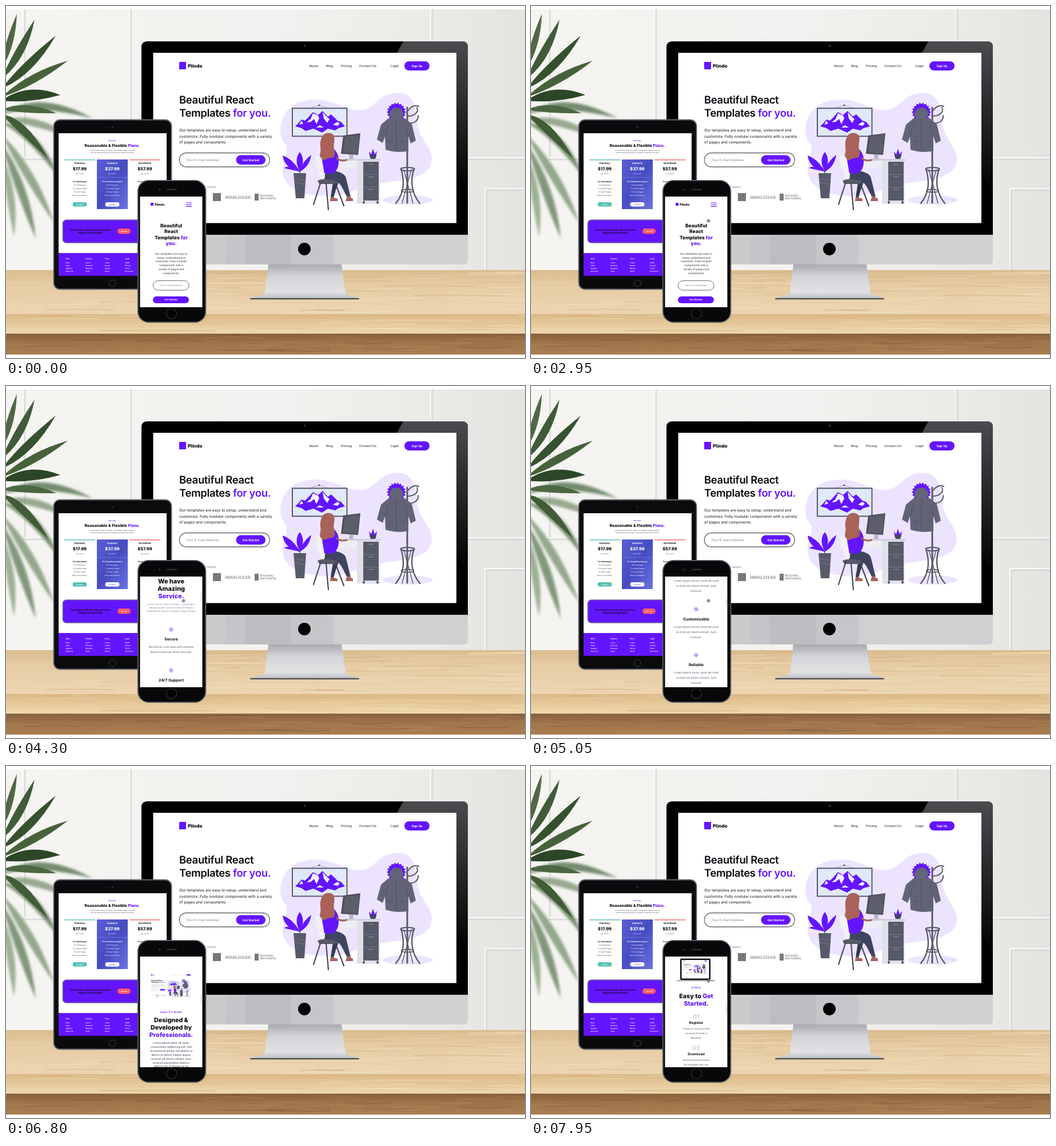
These frames come from a looping animation (908x617 px, 8 s). An HTML page:

```html
<!DOCTYPE html>
<html lang="en">
<head>
<meta charset="utf-8">
<title>Responsive templates</title>
<style>
html, body { margin: 0; width: 100%; height: 100%; overflow: hidden; background: #fff; }
svg { display: block; width: 100vw; height: 100vh; }
text { font-family: Inter, Roboto, sans-serif; text-rendering: geometricPrecision; }
text.serif { font-family: "Liberation Serif", "Noto Serif", serif; }
</style>
</head>
<body>
<svg id="stage" viewBox="0 0 908 617" preserveAspectRatio="none"></svg>
<script>
const PURPLE = '#6415ff', INK = '#0b0b12', SLATE = '#4a5060', MUTED = '#8a96a8';
const BRAND = 'Plindo';

// ---- drawing helpers ----
const attrs = (o) => Object.entries(o).map(([k, v]) => ` ${k}="${v}"`).join('');
const rect = (x, y, w, h, fill, r = 0, more = {}) =>
  `<rect x="${x}" y="${y}" width="${w}" height="${h}" rx="${r}" fill="${fill}"${attrs(more)}/>`;
const path = (d, fill, more = {}) => `<path d="${d}" fill="${fill}"${attrs(more)}/>`;
const line = (d, stroke, w = 1, more = {}) =>
  path(d, 'none', { stroke, 'stroke-width': w, 'stroke-linecap': 'round', 'stroke-linejoin': 'round', ...more });
const oval = (x, y, rx, ry, fill, more = {}) =>
  `<ellipse cx="${x}" cy="${y}" rx="${rx}" ry="${ry}" fill="${fill}"${attrs(more)}/>`;
// y is the optical middle of the line
const text = (x, y, str, size, weight = 500, fill = INK, anchor = 'middle', more = {}) =>
  `<text x="${x}" y="${(y + size * 0.36).toFixed(2)}" font-size="${size}" font-weight="${weight}" fill="${fill}" text-anchor="${anchor}"${attrs(more)}>${str}</text>`;
const left = (x, y, str, size, weight, fill, more) => text(x, y, str, size, weight, fill, 'start', more);
const lines = (x, y, gap, rows, size, weight, fill, anchor) =>
  rows.map((row, i) => text(x, y + i * gap, row, size, weight, fill, anchor)).join('');
const pill = (x, y, w, h, label, size, fill = PURPLE, ink = '#fff') =>
  rect(x, y, w, h, fill, h / 2) + text(x + w / 2, y + h / 2, label, size, 700, ink);
const accent = (str) => `<tspan fill="${PURPLE}">${str}</tspan>`;
const gradient = (id, stops, x2 = 0, y2 = 1) =>
  `<linearGradient id="${id}" x2="${x2}" y2="${y2}">` +
  stops.map(([o, c]) => `<stop offset="${o}" stop-color="${c}"/>`).join('') + '</linearGradient>';

let seed = 7;
const rnd = () => (seed = (seed * 16807) % 2147483647) / 2147483647;

// ---- room ----
function leaf(x0, y0, cx, cy, x1, y1, w, fill, opacity = 1) {
  const dx = x1 - x0, dy = y1 - y0, len = Math.hypot(dx, dy);
  const nx = -dy / len * w, ny = dx / len * w;
  return path(`M${x0} ${y0}Q${cx + nx} ${cy + ny} ${x1} ${y1}Q${cx - nx} ${cy - ny} ${x0} ${y0}`, fill, { opacity });
}

function molding(x, y, w, h) {
  return rect(x, y, w, h, 'none', 0, { stroke: '#d9d8d6', 'stroke-width': 5, opacity: .7 }) +
    rect(x - 2, y - 2, w, h, 'none', 0, { stroke: '#fafafa', 'stroke-width': 2 });
}

function grain(count, y0, h, w, dark, light) {
  let s = '';
  for (let i = 0; i < count; i++) {
    const x = rnd() * 980 - 80, y = y0 + rnd() * h, len = w * (.3 + rnd());
    s += line(`M${x.toFixed()} ${y.toFixed(1)}q${(len / 2).toFixed()} ${(rnd() * 6 - 3).toFixed(1)} ${len.toFixed()} 0`,
      rnd() < .5 ? dark : light, (.8 + rnd() * 2).toFixed(1), { opacity: .28 });
  }
  return s;
}

function room() {
  let s = rect(0, 6, 908, 460, 'url(#wall)');
  s += molding(32, -20, 186, 288) + molding(745, -20, 180, 288) + molding(840, 322, 90, 170);
  s += rect(0, 0, 908, 6, '#fff');

  s += '<g filter="url(#soft)">' +
    leaf(-8, 190, 55, 158, 152, 197, 14, '#5f7a59', .85) + leaf(-8, 200, 50, 195, 118, 232, 13, '#78916f', .75) +
    leaf(-8, 205, 45, 215, 92, 300, 15, '#647f5c', .85) + leaf(-8, 225, 40, 290, 84, 380, 15, '#7c9674', .8) +
    leaf(-8, 240, 30, 320, 52, 408, 15, '#66805f', .8) + leaf(-8, 260, 12, 330, 14, 405, 13, '#87a07e', .8) + '</g>';
  s += '<g filter="url(#haze)">' +
    leaf(-8, 110, 6, 70, 19, 14, 11, '#4f6844') + leaf(-8, 128, 24, 88, 50, 24, 14, '#3f5b38') +
    leaf(-8, 145, 36, 112, 87, 52, 15, '#35512f') + leaf(-8, 160, 45, 128, 108, 96, 14, '#46623a') +
    leaf(-8, 166, 40, 152, 95, 156, 19, '#2c4728') + leaf(-8, 182, 35, 176, 88, 188, 13, '#4c6742') +
    leaf(-8, 190, 26, 205, 74, 268, 14, '#405d38') + '</g>';

  s += rect(0, 463, 908, 77, 'url(#top)') + rect(0, 540, 908, 35, 'url(#edge)') + rect(0, 575, 908, 36, 'url(#under)');
  s += grain(70, 465, 73, 150, '#c79d69', '#f7e8cb') + grain(24, 542, 31, 170, '#cfa672', '#f6e4c0') +
    grain(36, 578, 30, 90, '#6f4c2e', '#bd9064');
  return s + rect(0, 574, 908, 1.5, '#7d5835', 0, { opacity: .6 }) + rect(0, 611, 908, 6, '#fff');
}

// ---- hero artwork ----
function art() {
  const dark = '#575a68', deep = '#45485a', pale = '#d9d9e2';
  let s = path('M480 217C482 185 502 165 540 164C580 163 600 190 632 180C650 172 655 152 687 152C714 153 718 180 720 205C722 232 745 246 745 268C744 300 705 304 668 309C625 314 600 333 560 333C515 333 488 318 484 292C482 270 496 255 489 243C484 236 480 230 480 217Z', '#ece4ff');
  s += oval(703, 340, 44, 8, '#ece4ff');
  // picture
  s += line('M532 179L548 174L564 179', '#8a8a94', .7) + oval(548, 174, 1.6, 1.6, dark);
  s += rect(501, 179.3, 95.5, 49, '#dfe9f8', 0, { stroke: dark, 'stroke-width': 2 });
  s += path('M506 211L512 205L517 199L523 201L530 194L537 186L546 191L554 184L563 194L569 190L580 201L586 203L593 211L582 214L576 218L563 215L553 222L538 215L524 219L517 214Z', PURPLE);
  s += path('M537 188L533 198L526 204L533 203L539 198L543 207L548 197L546 192ZM554 186L556 197L562 205L566 198L562 195ZM517 201L513 208L520 206ZM580 203L572 208L580 210L584 206ZM549 209L543 213L556 213Z', '#f5f8ff');
  // desk, screen and small plant
  s += path('M590 227L620 223L616 261L586 259Z', '#4c4d5a') + path('M593 229L618 225.5L614.5 259L589.5 257Z', '#5d5e6b');
  s += path('M600 260L608 261L607 267L613 269H597L601 266Z', '#b5b5c0');
  s += rect(580, 268, 75, 3.5, '#cfcfd9') + rect(541, 271, 73, 13, '#ededf3') + rect(614, 271.5, 40, 75, '#e1e1e9');
  s += rect(625, 273, 27, 68, dark) + [295, 317].map(y => rect(625, y, 27, .8, '#7d7f8e')).join('') +
    [277, 299, 321].map(y => rect(634, y, 9, .9, '#9698a6')).join('');
  s += oval(626, 344, 1.8, 2.5, deep) + oval(650, 344, 1.8, 2.5, deep);
  s += path('M637 266L635 255L639 260L642 250L645 260L649 254L647 266Z', PURPLE) + path('M636 261H648L646 268H638Z', deep);
  // floor plant
  const frond = (x, y, cx, cy, w) => leaf(514, 290, cx, cy, x, y, w, PURPLE);
  s += line('M514 294V275M514 292L503 280M514 291L524 279', deep, 1);
  s += frond(484, 262, 494, 276, 11) + frond(514, 256, 514, 270, 11) + frond(534, 261, 524, 278, 8) + frond(486, 284, 498, 282, 5);
  s += path('M503 293H525L522 337H507Z', dark) + line('M504 302L524 306M505 309L523 313', '#77798a', 1);
  // seated figure seen from behind
  s += path('M560 288C572 287 589 291 594 299C598 313 600 324 603 334L597 336C591 324 587 314 581 309C572 312 560 309 556 303Z', '#3e4460');
  s += path('M583 306L577 322L573 336L568 335L572 310Z', '#343a54');
  s += path('M597 332L607 338V342H594ZM568 334L580 338V342H567Z', '#a3655b');
  s += path('M558 250C568 244 580 252 582 267C583 281 579 292 569 294L556 293C551 280 551 262 558 250Z', PURPLE);
  s += line('M579 267C584 271 588 272 596 270', '#a3655b', 3);
  s += path('M555 226C560 221 570 221 574 228C576 236 572 243 574 251C577 258 575 266 570 266C560 266 557 273 551 269C546 265 552 256 550 247C549 239 551 231 555 226Z', '#a86259');
  s += path('M541 264C545 260 551 263 553 270L558 300C557 305 552 305 549 300Z', '#f1f1f6');
  s += path('M545 306C554 302 572 303 580 308L578 312L548 312Z', dark);
  s += line('M551 308L538 348M576 310L591 350M560 311L564 357', deep, 2.2);
  // coat rack
  s += line('M702 178V345', dark, 3) + line('M702 193C716 193 722 186 719 178M702 205C712 207 722 202 721 192M704 183C708 176 716 173 722 176', dark, 2);
  s += line('M691 285C697 306 698 326 682 346M714 285C707 306 708 326 724 346', dark, 2.4) + line('M696 287C702 310 707 326 712 346M709 287C703 310 698 326 693 346', dark, 1.4);
  s += oval(702.5, 286, 12, 3, 'none', { stroke: dark, 'stroke-width': 2.2 }) + oval(702.5, 324, 11, 2.5, 'none', { stroke: dark, 'stroke-width': 1.6 });
  const fur = Array.from({ length: 36 }, (_, i) => {
    const a = i * Math.PI / 18, r = i % 2 ? 14 : 17;
    return `${(683 + r * Math.cos(a)).toFixed(1)} ${(186 + r * Math.sin(a)).toFixed(1)}`;
  });
  s += path('M' + fur.join('L') + 'Z', PURPLE) + oval(683, 189, 12, 11, '#62647a');
  s += path('M669 197L698 197L710 207L717 236L708 241L704 228V254C692 257 676 256 664 252L663 229L659 240L649 234L656 208Z', '#626476');
  s += line('M683 199V254M664 228L668 210M704 227L699 210', '#4b4d60', 1) + line('M669 238H676M690 238H698', '#4b4d60', 1);
  return s;
}

function hero() {
  const nav = [[530, 'About'], [560, 'Blog'], [586, 'Pricing'], [618, 'Contact Us'], [672.5, 'Login']];
  const title = { 'letter-spacing': -.35 };
  return rect(303, 98, 12, 13, PURPLE) + left(318, 105, BRAND, 8.2, 800) +
    nav.map(([x, s]) => left(x, 105.3, s, 5.6, 600, SLATE)).join('') + pill(697, 97, 44, 16, 'Sign Up', 5) +
    left(303, 164, 'Beautiful React', 18.5, 600, INK, title) +
    left(303, 187.6, 'Templates ' + accent('for you.'), 18.5, 600, INK, title) +
    lines(303, 217.5, 10.8, ['Our templates are easy to setup, understand and',
      'customize. Fully modular components with a variety', 'of pages and components.'], 6.55, 500, '#30333d', 'start') +
    rect(303.3, 257.5, 158, 24.5, '#fff', 12.2, { stroke: '#666671', 'stroke-width': 1.3 }) +
    left(315, 269.7, 'Your E-mail Address', 6, 400, '#858591') + pill(402.5, 261.5, 51.5, 16.5, 'Get Started', 5.2) +
    text(368, 317.5, 'OUR TRUSTED CUSTOMERS', 4.4, 600, MUTED, 'end', { 'letter-spacing': .4 }) +
    rect(362, 328, 14, 14, '#77777c') +
    left(383, 335.3, 'BRISKLEDGER', 7.8, 400, '#77777c', { class: 'serif', 'letter-spacing': -.8 }) +
    rect(435, 329, 7, 12, '#77777c') + left(444, 332.7, 'REGIONAL', 4.8, 500, '#77777c') + left(444, 337.7, 'WAYFARERS', 4.8, 500, '#77777c') +
    '<use href="#art"/>';
}

// ---- devices ----
function desktop() {
  return path('M459 453H587L594 503C595 508 610 508 618 513H427C436 508 452 508 453 503Z', 'url(#neck)') +
    rect(427, 512, 191, 2.2, '#4b4b55', 1) +
    path('M237 401H808V445Q808 453 800 453H245Q237 453 237 445Z', '#d0d0d3') +
    rect(350, 401, 34, 52, '#cacacc') + rect(384, 401, 34, 52, '#c4c5c8') + rect(418, 401, 81, 52, '#bcbdc1') + rect(499, 401, 74, 52, '#c5c6c9') +
    path('M237 401V72Q237 62 247 62H798Q808 62 808 72V401Z', '#000') +
    path('M695 62H798Q808 62 808 72V330L788 290V82H684Z', 'url(#glare)') +
    oval(522.5, 69.5, 2, 2, '#2d2d33') + rect(257.5, 82, 530.5, 298.5, '#fff') +
    '<use href="#hero"/>' + oval(522, 426, 11, 11, '#000');
}

function tablet() {
  const card = (x, name, price, bar, mid) => {
    const ink = mid ? '#fff' : INK, soft = mid ? '#e8e9ff' : '#5f6572';
    return (mid ? rect(x - 27, 269, 54, 87, 'url(#plan)') : rect(x - 27, 269, 54, 1.4, bar)) +
      text(x, 275.5, name, 3.6, 700, ink) + text(x, 285, price, 7.4, 800, ink) + text(x, 293.5, 'per month', 2.8, 500, soft) +
      (mid ? rect(x - 27, 300, 54, .5, '#8d92f2') : '') + text(x, 308, mid ? 'For Small Businesses' : 'For Individuals', 3.4, 700, ink) +
      lines(x, 314.3, 5.8, ['30 Templates', '7 Landing Pages', '12 Inner Pages', 'Basic Assistance'], 3.2, 500, soft) +
      pill(x - 12.5, 344, 25, 7.5, 'Buy Now', 2.6, mid ? '#fff' : bar, mid ? '#5a5fd0' : '#fff');
  };
  const cols = [[104.5, 'Main', 'Blog|FAQs|Support|About Us'], [139, 'Product', 'Log In|Personal|Business|Team'],
    [173, 'Press', 'Logos|Events|Stories|Office'], [208, 'Legal', 'GDPR|Privacy|Terms|Disclaimer']];
  return rect(83.5, 199.5, 206, 297, '#0b0b0d', 11, { stroke: '#646973', 'stroke-width': 1.8 }) +
    oval(186, 212, 1.6, 1.6, '#30343f') + oval(186, 486, 6, 6, 'none', { stroke: '#3f4148', 'stroke-width': 1 }) +
    rect(92, 223, 189, 250, '#fff') +
    text(186, 236.3, 'PRICING', 2.7, 700, PURPLE, 'middle', { 'letter-spacing': .4 }) +
    text(186, 244.5, 'Reasonable &amp; Flexible ' + accent('Plans.'), 6.9, 800) +
    lines(186, 253.3, 4, ['Lorem ipsum dolor sit amet, consectetur adipiscing elit,', 'sed do eiusmod tempor incididunt ut labore et dolore.'], 3, 500, '#5d6370') +
    card(129, 'PERSONAL', '$17.99', '#55c2b4') + card(186, 'BUSINESS', '$37.99', '', true) + card(243, 'ENTERPRISE', '$57.99', '#f56565') +
    rect(99.5, 375, 175, 40, PURPLE, 6, { stroke: '#6a64a0', 'stroke-width': 1.6 }) +
    lines(148, 392.3, 5.4, ['Developers all over the world are', `happily using ${BRAND}.`], 4.4, 700, '#12061f') +
    pill(195, 390, 23, 9.5, 'Sign Up', 3, '#ff5a66') +
    rect(92, 433, 189, 40, PURPLE) +
    cols.map(([x, head, items]) => left(x, 443, head, 3, 700, '#fff') +
      lines(x, 449.6, 5, items.split('|'), 2.9, 600, '#fff', 'start')).join('');
}

function page() {
  const C = 289;
  const icon = (y) => path(`M${C} ${y - 3}L${C + 2.7} ${y - 2}V${y}Q${C + 2.5} ${y + 2} ${C} ${y + 3.2}Q${C - 2.5} ${y + 2} ${C - 2.7} ${y}V${y - 2}Z`,
    '#f0e8ff', { stroke: PURPLE, 'stroke-width': .7 }) + oval(C, y, .9, .9, PURPLE);
  const tag = (y, s) => text(C, y, s, 4, 700, PURPLE, 'middle', { 'letter-spacing': .6 });
  const filler = ['Lorem ipsum donor amet siti ceali', 'ut enim ad minim veniam, quis', 'nostrud.'];
  const feature = (y, name, rows = filler) => icon(y - 17) + text(C, y, name, 6.8, 700) + lines(C, y + 13.5, 9.1, rows, 4.9, 500, '#6a7280');
  const step = (y, n, name, rows) => text(C, y, n, 10, 600, '#bcc5d3') + text(C, y + 10.5, name, 6, 700) +
    lines(C, y + 21.3, 8, rows, 4.3, 500, '#6a7280');

  let s = rect(253, 345, 5, 5, PURPLE) + left(260, 347.6, BRAND, 5.6, 800) +
    lines(C, 384.8, 10.4, ['Beautiful', 'React', 'Templates ' + accent('for'), accent('you.')], 8.5, 800) +
    lines(C, 434, 6.85, ['Our templates are easy to', 'setup, understand and', 'customize. Fully modular', 'components with a', 'variety of pages and', 'components.'], 4.6, 500, '#434753') +
    rect(257.3, 481.5, 62.8, 16.6, '#fff', 8.3, { stroke: '#5c5c68', 'stroke-width': .9 }) +
    text(C, 489.8, 'Your E-mail Address', 4.1, 400, '#85858f') + pill(257, 509, 63, 12, 'Get Started', 4);
  s += text(C, 537, 'OUR TRUSTED CUSTOMERS', 4, 600, MUTED, 'middle', { 'letter-spacing': .35 }) +
    left(260, 547, 'PINEWAY', 3.2, 600, '#888') + rect(278, 545, 5, 5, '#77777c') +
    left(285, 547, 'BRISKLEDGER', 3.2, 400, '#777', { class: 'serif', 'letter-spacing': -.25 }) +
    rect(304.5, 545, 2.4, 4.4, '#888') + left(308, 547, 'REGION', 2.6, 500, '#888') +
    `<use href="#art" transform="translate(142.8 519) scale(.238)"/>`;
  s += tag(687, 'FEATURES') + lines(C, 701, 13, ['We have', 'Amazing', accent('Service.')], 10.9, 800) +
    lines(C, 741, 6.2, ['Lorem ipsum dolor sit amet, consectetur', 'adipiscing elit, sed do eiusmod tempor', 'incididunt ut labore et dolore magna aliqua.'], 4.2, 500, MUTED) +
    feature(803, 'Secure', ['We strictly only deal with vendors', 'that provide top notch security.']) +
    ['24/7 Support', 'Customizable', 'Reliable', 'Fast', 'Easy'].map((n, i) => feature(874.5 + 80.5 * i, n)).join('');
  s += `<use href="#hero" transform="translate(206.3 1307) scale(.1575)"/>` + tag(1388.5, 'QUALITY WORK') +
    lines(C, 1402.5, 12.8, ['Designed &amp;', 'Developed by', accent('Professionals.')], 10.7, 800) +
    lines(C, 1442.5, 6.9, ['Lorem ipsum dolor sit amet,', 'consectetur adipiscing elit, sed', 'do eiusmod tempor incididunt ut', 'labore et dolore magna aliqua.', 'Ut enim ad minim veniam, quis', 'nostrud exercitation ullamco', 'laboris nisi ut aliquip ex ea', 'commodo consequat.'], 4.8, 500, '#4c5260') +
    pill(268, 1511, 42, 13, 'Learn More', 4.2);
  s += rect(261, 1572.5, 53, 37.5, '#0d0d11', 2) + rect(263.5, 1575, 48, 32.5, '#fff') +
    `<use href="#hero" transform="translate(239.3 1567) scale(.0923)"/>` +
    rect(255, 1610, 67, 2, '#b9bac2', 1) + rect(255, 1611.3, 67, .7, '#777') +
    tag(1624, 'STEPS') + lines(C, 1638.3, 13, ['Easy to ' + accent('Get'), accent('Started.')], 10.7, 800) +
    step(1674, '01', 'Register', ['Create an account with', 'us using Doodad or', 'Wavelink.']) +
    step(1729.5, '02', 'Download', ['Browse and Download', 'the template that you', 'like from the marketplace.']);
  return s;
}

function phone() {
  const menu = ['About', 'Blog', 'Pricing', 'Contact Us', 'Login'];
  return rect(230.8, 305.8, 118.6, 248.6, '#08080a', 19, { stroke: '#5d616b', 'stroke-width': 1.8 }) +
    rect(281, 320.5, 18, 2.6, '#2c2d33', 1.3) + oval(268.5, 321.8, 2, 2, '#26272f') +
    oval(289.5, 539, 9, 9, '#050506', { stroke: '#33343a', 'stroke-width': 1.2 }) +
    rect(234.5, 334, 109, 194, '#fff') + '<g clip-path="url(#screen)"><g id="page">' + page() + '</g>' +
    '<g id="menu">' + rect(237, 330, 104.5, 141, '#fff', 2, { stroke: '#d6d6da', 'stroke-width': .6, filter: 'url(#shade)' }) +
    lines(288.7, 370.6, 11.25, menu, 5.5, 600, '#30333d') + pill(267, 424, 40.5, 15, 'Sign Up', 5.2) + '</g>' +
    '<g id="toggle">' + line('M315 345H324.5M315 348.2H324.5M315 351.4H324.5', PURPLE, 1.1, { id: 'bars' }) +
    line('M316.4 345L323 351.6M323 345L316.4 351.6', PURPLE, 1.4, { id: 'cross' }) + '</g>' +
    rect(341, 0, 1.4, 14, '#d2d2d6', .7, { id: 'thumb' }) +
    oval(0, 0, 3, 3, '#666', { id: 'touch', opacity: .7 }) + '</g>';
}

const defs = gradient('wall', [[0, '#f5f4f1'], [.5, '#f3f2f0'], [.8, '#ecebe8'], [1, '#e4e3e0']], 1, 0) +
  gradient('top', [[0, '#dabb8d'], [.3, '#e5cba3'], [1, '#ecd5b0']]) +
  gradient('edge', [[0, '#dab786'], [.5, '#e6ca9b'], [1, '#efd8ad']]) +
  gradient('under', [[0, '#87603d'], [.4, '#9f7349'], [1, '#ab7e53']]) +
  gradient('neck', [[0, '#a9aaae'], [.35, '#d3d4d7'], [.8, '#e2e2e5'], [1, '#bcbdc2']]) +
  gradient('glare', [[0, '#4b4b4f'], [.4, '#2c2c30'], [1, '#000']]) +
  gradient('plan', [[0, '#5a5fd6'], [.5, '#464bc0'], [1, '#6b74e2']], 1, 1) +
  '<filter id="soft"><feGaussianBlur stdDeviation="2.2"/></filter>' +
  '<filter id="haze"><feGaussianBlur stdDeviation=".7"/></filter>' +
  '<filter id="shade" x="-20%" y="-20%" width="140%" height="140%"><feDropShadow dx="0" dy="1" stdDeviation="1.2" flood-opacity=".3"/></filter>' +
  '<clipPath id="screen"><rect x="234.5" y="334" width="109" height="194"/></clipPath>' +
  `<g id="art">${art()}</g><g id="hero">${hero()}</g>`;

document.getElementById('stage').innerHTML = `<defs>${defs}</defs>` + room() + desktop() + tablet() + phone();

// ---- motion ----
const LOOP = 8000, STEP = 50, OPEN = 900, CLOSE = 2150;
const SCROLL = [[2950, 0], [3750, 209], [3800, 209], [4050, 345], [4200, 345], [4750, 505], [4900, 505], [5350, 665],
  [5550, 665], [6000, 882], [6150, 882], [6600, 955], [6750, 955], [7550, 1150], [7600, 1150], [7950, 1235]];
const TOUCH_X = [[50, 302], [600, 320.5], [2300, 320.5], [2700, 310.5]];
const TOUCH_Y = [[50, 534], [600, 349.5], [2300, 349.5], [2700, 376.5]];

function track(keys, t) {
  const i = keys.findIndex(([k]) => t < k);
  if (i < 0) return keys[keys.length - 1][1];
  if (i === 0) return keys[0][1];
  const [t0, a] = keys[i - 1], [t1, b] = keys[i], u = (t - t0) / (t1 - t0);
  return a + (b - a) * u * u * (3 - 2 * u);
}

function spring(ms) {
  if (ms <= 0) return 0;
  const t = ms / 1000, w = 18.5, d = 12.5;
  return 1 - Math.exp(-d * t) * (Math.cos(w * t) + d / w * Math.sin(w * t));
}

const $ = (id) => document.getElementById(id);
const move = (id, x, y) => $(id).setAttribute('transform', `translate(${x.toFixed(2)} ${y.toFixed(2)})`);
const show = (id, on) => $(id).setAttribute('visibility', on ? 'visible' : 'hidden');

function draw(now) {
  const t = Math.floor((now % LOOP) / STEP) * STEP;
  const y = track(SCROLL, t), open = t >= OPEN && t < CLOSE;
  move('page', 0, -y);
  move('toggle', 0, -y);
  move('menu', 160 * (t < CLOSE ? 1 - spring(t - OPEN) : spring(t - CLOSE)), 0);
  show('menu', t > OPEN && t < 2700);
  show('bars', !open);
  show('cross', open);
  move('thumb', 0, 335 + y * .069);
  show('thumb', y > 0);
  move('touch', track(TOUCH_X, t), track(TOUCH_Y, t));
}

function tick() {
  draw(performance.now());
  requestAnimationFrame(tick);
}
tick();
</script>
</body>
</html>
```
